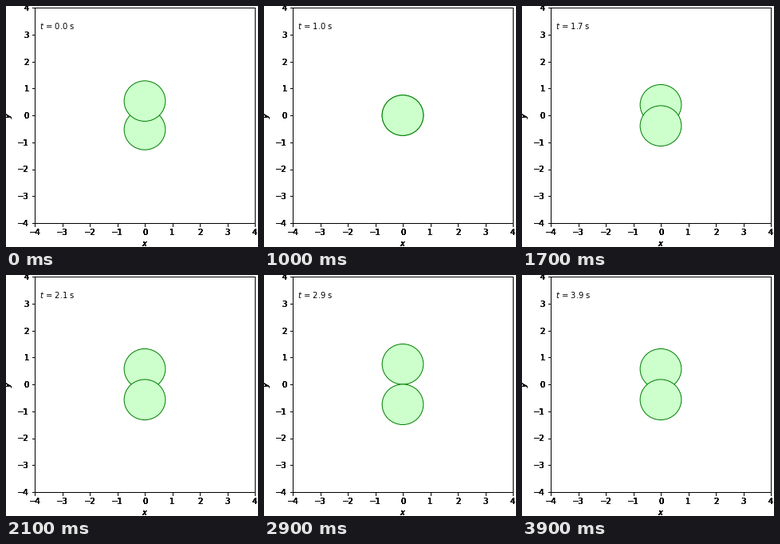
Write a matplotlib script that moves like this. It is 316 by 302 pixels and loops after 4 s.

```python
import math

import matplotlib.pyplot as plt
from matplotlib.animation import FuncAnimation
from matplotlib.patches import Circle

W, H, DPI = 316, 302, 72
FRAMES, INTERVAL = 40, 100
RADIUS = 0.75
LAYERS = 8  # stacked axes thicken the antialiased labels

plt.rcParams["font.family"] = "DejaVu Sans"
plt.rcParams["font.size"] = 10

fig = plt.figure(figsize=(W / DPI, H / DPI), dpi=DPI, facecolor="white")
BOX = [36 / W, 30 / H, 276 / W, 270 / H]


def add_layer(index):
    ax = fig.add_axes(BOX, label=f"layer{index}")
    ax.set(xlim=(-4, 4), ylim=(-4, 4), xlabel="$x$", ylabel="$y$")
    ax.set_xticks(range(-4, 5))
    ax.set_yticks(range(-4, 5))
    ax.patch.set_visible(index == 0)
    return ax


def add_disc(ax, zorder):
    disc = Circle((0, 0), RADIUS, facecolor="#ccffcc", edgecolor="green",
                  linewidth=1, zorder=zorder)
    return ax.add_patch(disc)


ax = [add_layer(i) for i in range(LAYERS)][0]
back, front = add_disc(ax, 2), add_disc(ax, 3)
clock = ax.text(0.02, 0.9, "", transform=ax.transAxes)


def update(frame):
    t = frame * INTERVAL / 1000
    y = RADIUS * math.cos(math.pi / 4 * (t + 1))
    front.center = (0, y)
    back.center = (0, -y)
    clock.set_text(f"$t$ = {t:.1f} s")
    return back, front, clock


anim = FuncAnimation(fig, update, frames=FRAMES, interval=INTERVAL,
                     init_func=lambda: update(0), repeat=True, repeat_delay=0)
plt.show()
```
